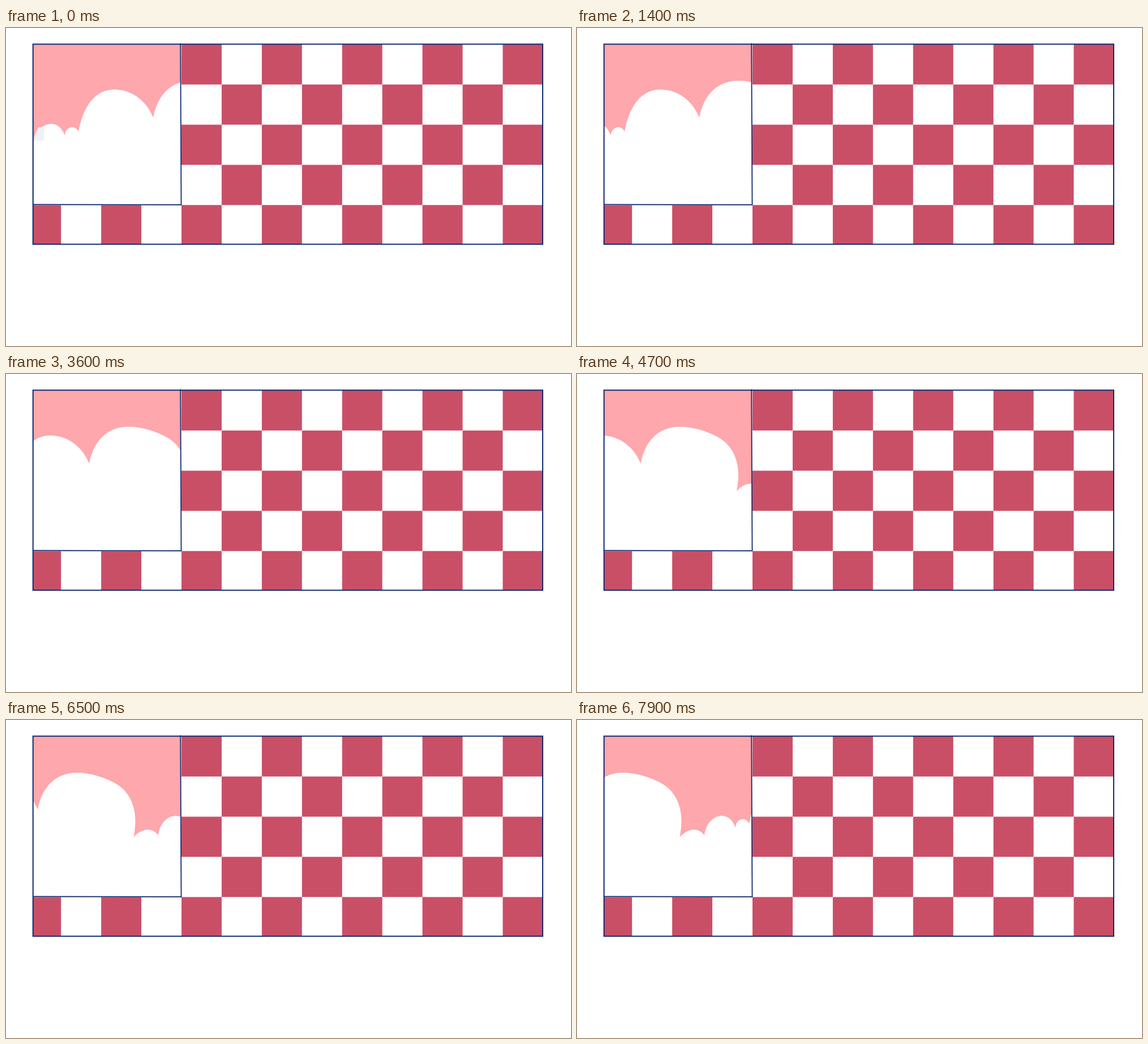
Write an HTML page that moves like this. It is 998 px wide and 561 px high and loops after 8000 ms.

```html
<!DOCTYPE html>
<html lang="en">
<head>
<meta charset="utf-8">
<title>Drifting clouds</title>
<style>
  html, body { margin: 0; width: 100%; height: 100%; overflow: hidden; background: #fff; }
  svg { display: block; width: 998px; height: 561px; }
  .tile, #checks { fill: #c94f67; }
  .line { fill: none; stroke: #0f2a6e; }
  /* ten picture changes per second */
  .drift { animation: drift 8s steps(80) -20ms infinite; }
  @keyframes drift { to { transform: translateX(-251.2px); } }
</style>
</head>
<body>
<svg viewBox="0 0 998 561">
  <defs>
    <clipPath id="pane"><path d="M48 28.5H308.3L309.5 311.5H48Z"/></clipPath>
    <clipPath id="board"><rect x="48" y="28.8" width="900" height="353"/></clipPath>
    <pattern id="check" x="310" y="28.8" width="141.86" height="141.76" patternUnits="userSpaceOnUse">
      <path class="tile" d="M0 0H70.93V70.88H0ZM70.93 70.88H141.86V141.76H70.93Z"/>
    </pattern>
    <path id="cloud" d="M49 204
      C51 183 65 169 80 169 C91 169 100 178 104 190
      C104 181 110 175 117 175 C122 175 126 178 128 183
      C137 134 160 108.5 191 108.5 C222 108.5 248 128 260 158
      C268 117 292 93 330 93 C352 93 377 101 395 110.5
      C421 124 432.5 150 432.5 178 C432.5 188 431 198 429.5 207
      C436 199 445 193.5 454.5 193.5 C463 193.5 469 198 473.5 204
      V330H49Z"/>
  </defs>

  <g clip-path="url(#board)">
    <rect x="48" y="28.8" width="900" height="354.4" fill="url(#check)"/>
  </g>
  <path d="M48 28.5H310V312.3H48Z" fill="#fff"/>

  <g clip-path="url(#pane)">
    <rect x="48" y="28" width="262" height="284" fill="#fea7ac"/>
    <g class="drift" fill="#fff">
      <use href="#cloud"/>
      <use href="#cloud" x="424"/>
      <path d="M67 175V199H49.3C50 190 53 182 57.5 175Z" fill="#eff1f9"/>
    </g>
  </g>

  <path class="line" stroke-width="2" d="M47.7 28.5H948V381.6H47.7Z"/>
  <path class="line" stroke-width="1.8" d="M308.2 27L309.5 311.8L48 311.4"/>
</svg>
</body>
</html>
```
